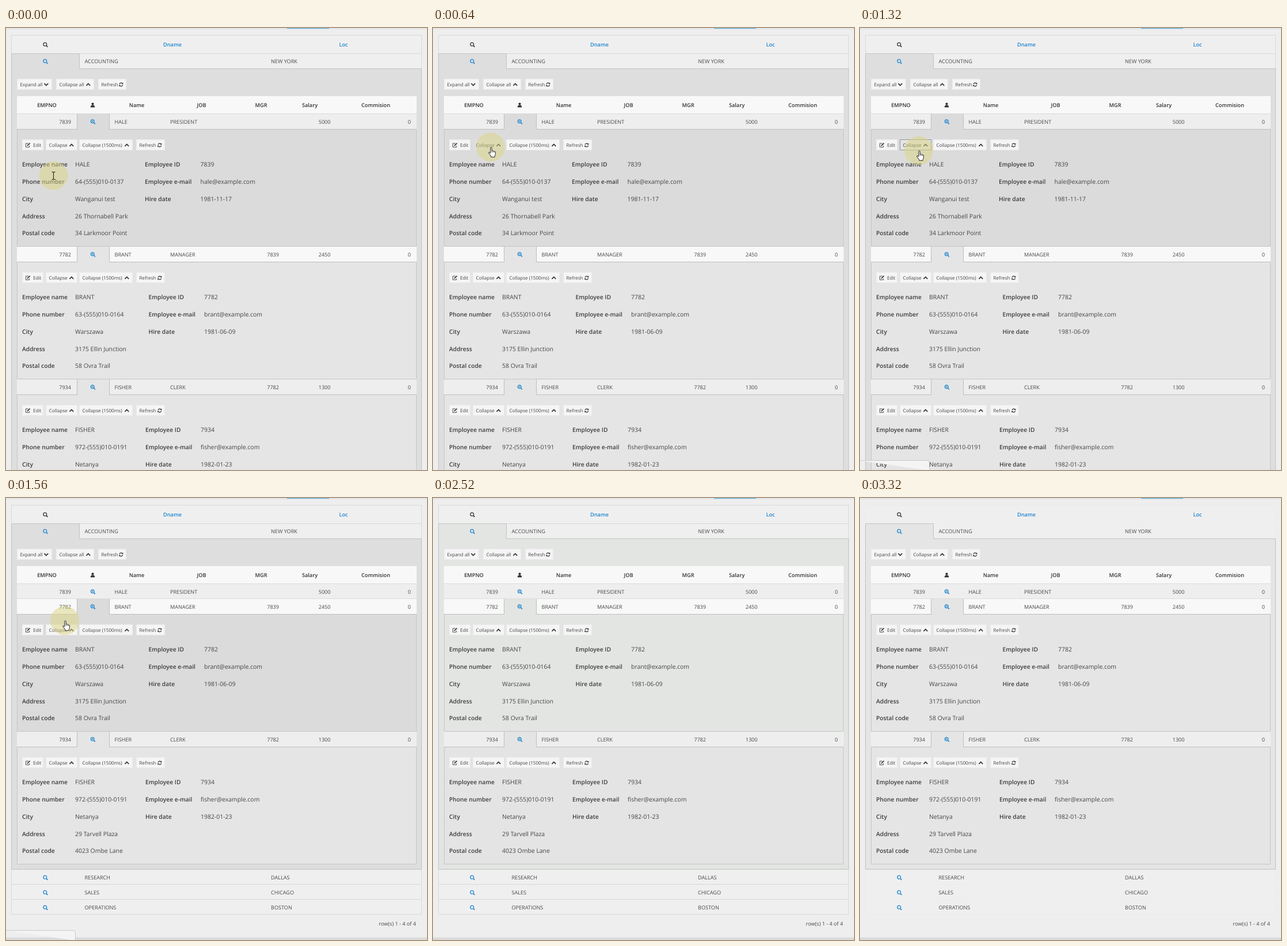
Recreate the animation shown at these times as an HTML page. Size 731x766 px, loop 3.36 s.

```html
<!DOCTYPE html>
<html lang="en">
<head>
<meta charset="utf-8">
<title>Employee details</title>
<style>
html, body { margin: 0; width: 100%; height: 100%; overflow: hidden; background: #efeeef; }
svg { display: block; width: 731px; height: 766px; text-rendering: geometricPrecision;
  font-family: "Open Sans", "Noto Sans", sans-serif; }
.row { font-size: 9.1px; fill: #484848; }
.head { font-size: 9.2px; font-weight: 600; fill: #333; }
.link { font-size: 9.2px; font-weight: 600; fill: #1c86cc; }
.btn { font-size: 8.15px; fill: #444; }
.label { font-size: 10.25px; font-weight: 600; fill: #3c3c3c; }
.value { font-size: 10.45px; fill: #454545; }
</style>
</head>
<body>
<svg id="stage" viewBox="0 0 731 766"></svg>
<script>
const LOOP = 3360, ROW = 26, PANEL = 204, BLUE = '#1c86cc', DARK = '#333';
const stage = document.getElementById('stage');

const staff = [
  { row: ['7839', 'HALE', 'PRESIDENT', '', '5000'], col: 241, val: 337.5,
    left: ['HALE', '64-(555)010-0137', 'Wanganui test', '26 Thornabell Park', '34 Larkmoor Point'],
    right: ['7839', 'hale@example.com', '1981-11-17'] },
  { row: ['7782', 'BRANT', 'MANAGER', '7839', '2450'], col: 247.5, val: 344,
    left: ['BRANT', '63-(555)010-0164', 'Warszawa', '3175 Ellin Junction', '58 Ovra Trail'],
    right: ['7782', 'brant@example.com', '1981-06-09'] },
  { row: ['7934', 'FISHER', 'CLERK', '7782', '1300'], col: 242, val: 338,
    left: ['FISHER', '972-(555)010-0191', 'Netanya', '29 Tarvell Plaza', '4023 Ombe Lane'],
    right: ['7934', 'fisher@example.com', '1982-01-23'] }
];
const leftLabels = ['Employee name', 'Phone number', 'City', 'Address', 'Postal code'];
const rightLabels = ['Employee ID', 'Employee e-mail', 'Hire date'];

// Each step inherits what it does not set.
const steps = [
  { at: 0, cursor: 'beam', x: 82.5, y: 256, open: true, button: '', status: false,
    outer: '#dfdedf', hot: '#dcdbdc', cool: '#e6e5e6', line: '#d9d8d9' },
  { at: 320, x: 91, y: 233 },
  { at: 640, cursor: 'hand', x: 100, y: 206.5, button: 'hover' },
  { at: 920, y: 207, status: true },
  { at: 1120, x: 100.5, y: 208 },
  { at: 1320, x: 102, y: 212.5, button: 'focus' },
  { at: 1560, open: false, button: '' },
  { at: 2040, cursor: '', status: false },
  { at: 2280, outer: '#e1e2e1', hot: '#e0e1e0' },
  { at: 2520, outer: '#e3e5e3', hot: '#e3e5e3', cool: '#e5e4e5' },
  { at: 2920, outer: '#e5e5e5', hot: '#e5e5e5', cool: '#e5e5e5', line: '#ecebec' }
];
steps.forEach((s, i) => { if (i) steps[i] = { ...steps[i - 1], ...s }; });

const text = (x, y, str, cls, anchor = 'start') =>
  `<text x="${x}" y="${y}" class="${cls}" text-anchor="${anchor}">${str}</text>`;
const rect = (x, y, w, h, fill, stroke = 'none') =>
  `<rect x="${x}" y="${y}" width="${w}" height="${h}" fill="${fill}" stroke="${stroke}"/>`;
const path = (d, stroke, width = 1, fill = 'none') =>
  `<path d="${d}" stroke="${stroke}" stroke-width="${width}" fill="${fill}"/>`;
const at = (x, y, body, scale = 1) => `<g transform="translate(${x} ${y}) scale(${scale})">${body}</g>`;

const search = (x, y, color, plus) => at(x, y,
  `<circle cx="-.7" cy="-.7" r="2.9" fill="none" stroke="${color}" stroke-width="1.3"/>` +
  path('M1.5 1.5L3.8 3.8', color, 1.7) + (plus ? path('M-2.2-.7H.8M-.7-2.2V.8', color, .8) : ''));

const icons = {
  up: path('M-3.4 1.8L0-1.6L3.4 1.8', DARK, 1.7),
  down: path('M-3.4-1.8L0 1.6L3.4-1.8', DARK, 1.7),
  refresh: at(1, 0, path('M-3-.7A3.1 3.1 0 0 1 2.4-2M3 .7A3.1 3.1 0 0 1-2.4 2', DARK, 1.3) +
    path('M3.8-3.8V-.8H.8ZM-3.8 3.8V.8H-.8Z', 'none', 0, DARK), .95),
  edit: at(0, 0, path('M1-3.2H-3.8V3.6H2.8V1', DARK, .9) + path('M-1.2 1.2L3.8-3.6', DARK, 1.7), .95),
  user: `<circle cy="-2" r="2.1" fill="${DARK}"/>` + path('M-3.8 4Q-3.8 0 0 0Q3.8 0 3.8 4Z', 'none', 0, DARK)
};

function button(x, y, w, label, icon, look) {
  const fill = { hover: '#dfdedf', focus: '#e4e3e4' }[look] || '#f6f5f6';
  const edge = look === 'focus' ? '#92979e' : look ? fill : '#ebeaeb';
  const first = icon === 'edit';
  return rect(x + .5, y + .5, w - 1, 18, fill, edge) +
    text(x + (first ? 19 : 5.6), y + 12.7, label, 'btn') +
    at(first ? x + 10 : x + w - 10.2, y + 10, icons[icon]);
}

function employee(p, y, i, s) {
  const open = i > 0 || s.open;
  const fill = i === (s.open ? 0 : 1) ? s.hot : s.cool;
  const [id, name, job, boss, pay] = p.row, base = y + 16.5;
  let out = rect(19, y, 694, ROW, i === 1 ? '#f9f8f9' : '#efeeef');
  if (open) {
    const top = y + ROW;
    out += rect(19, top, 694, PANEL, fill) + rect(123, y, 57, ROW + 1, fill) +
      path(`M19 ${top + .5}H123.5V${y}M179.5 ${y}V${top + .5}H713`, '#bfbebf') +
      path(`M19.5 ${top}V${top + PANEL - .5}H712.5V${top}`, '#c6c5c6') +
      button(28, top + 18, 37, 'Edit', 'edit') +
      button(69, top + 18, 55, 'Collapse', 'up', i ? '' : s.button) +
      button(127, top + 18, 93, 'Collapse (1500ms)', 'up') +
      button(226, top + 18, 50, 'Refresh', 'refresh');
    const line = n => top + 65.3 + n * 29.75;
    leftLabels.forEach((l, n) => out += text(28, line(n), l, 'label') + text(120, line(n), p.left[n], 'value'));
    rightLabels.forEach((l, n) => out += text(p.col, line(n), l, 'label') + text(p.val, line(n), p.right[n], 'value'));
  } else {
    out += path(`M19 ${y + ROW - .5}H713`, '#dddcdd');
  }
  return out + text(113, base, id, 'row', 'end') + search(151, y + 13.5, BLUE, true) +
    text(188.5, base, name, 'row') + text(285, base, job, 'row') +
    text(474, base, boss, 'row', 'end') + text(563.5, base, pay, 'row', 'end') +
    text(703, base, '0', 'row', 'end');
}

function department(y, name, city) {
  return search(68.5, y + 14, BLUE) + text(136.5, y + 17, name, 'row') + text(460, y + 17, city, 'row');
}

function pointer({ cursor, x, y }) {
  if (!cursor) return '';
  const shape = cursor === 'beam'
    ? path('M-3-6.5H-1L0-5.5L1-6.5H3M0-5.5V5.5M-3 6.5H-1L0 5.5L1 6.5H3', '#222', 1.1)
    : path('M-.2 1Q1.2-.6 2.2 1V6.3Q3.6 5.3 4.4 6.8Q5.8 6 6.6 7.5Q8.4 7 8.4 9V12Q8.4 14 7 15.5V17.2H.8V15.6L-3 10.6Q-3.8 8.8-2.2 8.8L-.2 10.5Z', '#222', 1, '#fff') +
      path('M2.2 6.3V9M4.4 6.8V9M6.6 7.5V9.3', '#222', .8);
  return at(x, y, '<circle r="25" fill="#dcd682" fill-opacity=".5"/>' + shape);
}

function scene(s) {
  const end = s.open ? 848 : 644;
  let out = path('M0 1.5H731', '#dcddde') + rect(488, 0, 73, 1.2, '#5cb4e4') +
    rect(10, 12, 712, end + 66, '#f0eff0') +
    path(`M9.5 44V12.5H721.5V70M9.5 44.5H721.5`, s.line) +
    search(68.5, 29, DARK) + text(289, 32, 'Dname', 'link', 'middle') + text(586, 32, 'Loc', 'link', 'middle') +
    rect(10, 70, 712, end - 70, s.outer) + rect(10, 45, 118, 26, s.outer) +
    path(`M9.5 ${end - .5}V44.5H127.5V70.5H721.5V${end - .5}Z`, '#c3c2c3') +
    department(44, 'ACCOUNTING', 'NEW YORK') +
    button(19, 88, 61, 'Expand all', 'down') + button(87, 88, 66, 'Collapse all', 'up') +
    button(160, 88, 49, 'Refresh', 'refresh') +
    rect(19, 118, 694, 31, '#f9f8f9') + path('M19 148.5H713', '#dddcdd');

  [['EMPNO', 71], ['Name', 227], ['JOB', 339.5], ['MGR', 443], ['Salary', 527.5], ['Commision', 642]]
    .forEach(([h, x]) => out += text(x, 136.8, h, 'head', 'middle'));
  out += at(150.5, 133.5, icons.user);

  let y = 149;
  staff.forEach((p, i) => {
    out += employee(p, y, i, s);
    y += ROW + (i || s.open ? PANEL : 0);
  });

  if (!s.open) {
    [['RESEARCH', 'DALLAS'], ['SALES', 'CHICAGO'], ['OPERATIONS', 'BOSTON']].forEach((d, i) => {
      const top = end + i * ROW;
      out += path(`M9.5 ${top}V${top + 25.5}H721.5V${top}`, s.line) + department(top, ...d);
    });
    out += text(712, 741.2, 'row(s) 1 - 4 of 4', 'row', 'end') + rect(0, 761.5, 731, 4.5, '#dcdbdc');
  }
  if (s.status) out += path('M-1 749.5H117Q120.5 749.5 120.5 753V767', '#cccbcc', 1, '#f5f4f5');
  return out + pointer(s);
}

const start = performance.now();
let shown;
function tick(now) {
  const t = Math.max(0, now - start) % LOOP;
  const step = steps.findLast(s => s.at <= t);
  if (step !== shown) stage.innerHTML = scene(shown = step);
  requestAnimationFrame(tick);
}
tick(start);
</script>
</body>
</html>
```
